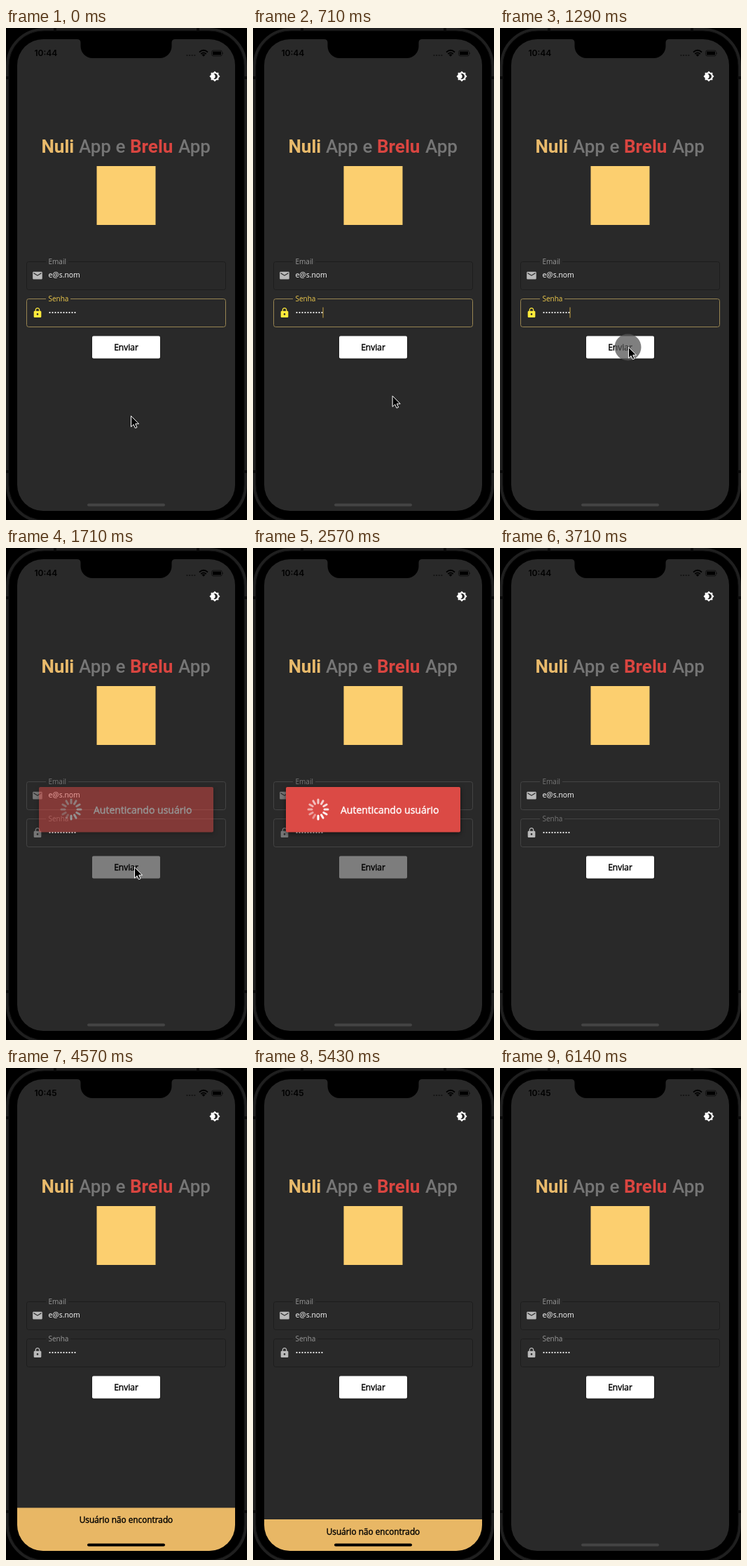
Write an HTML page that moves like this. It is 344 px wide and 702 px high and loops after 6.28 s.

```html
<!DOCTYPE html>
<html lang="pt-BR">
<head>
<meta charset="utf-8">
<title>Login</title>
<style>
html, body { margin: 0; width: 100%; height: 100%; overflow: hidden; background: #000; }
svg {
  display: block; width: 100%; height: 100%; font: 12px "Open Sans", sans-serif;
  --line: #1d1d1d; --label: #999; --icon: #b9b9b9; --button: #fff;
  --pass-line: var(--line); --pass-label: var(--label); --pass-icon: var(--icon);
}
svg.focus { --pass-line: #988552; --pass-label: #f0cb4c; --pass-icon: #ffeb3b; }
svg.busy { --line: #444; --label: #777; --icon: #777; --button: #7d7d7d; }
svg.settling { --line: #444; --label: #777; }
.mail rect { stroke: var(--line); }
.mail .label { fill: var(--label); }
.mail path { fill: var(--icon); }
.pass rect { stroke: var(--pass-line); }
.pass .label { fill: var(--pass-label); }
.pass path { fill: var(--pass-icon); }
.label { font-size: 10px; }
.title { font: 700 26px Roboto, sans-serif; }
.title .plain { font-weight: 500; fill: #757575; }
.heavy { stroke: currentColor; stroke-width: .4; fill: currentColor; }
#button { fill: var(--button); }
svg:not(.busy) #button { filter: drop-shadow(0 1px 1px #0006); }
#dialog rect { filter: drop-shadow(0 2px 3px #0008); }
</style>
</head>
<body>
<svg id="stage" viewBox="0 0 344 702">
  <clipPath id="screen"><rect x="16" y="16" width="311" height="673" rx="37"/></clipPath>

  <g fill="none">
    <rect x="2" y="2" width="340" height="702" rx="52" stroke="#1f1f1f" stroke-width="4"/>
    <rect x="4" y="4" width="336" height="698" rx="50" stroke="#0f0f0f"/>
    <path d="M0 71h5M339 71h5M0 633h5M339 633h5M70 0v5M274 0v5" stroke="#0a0a0a" stroke-width="4"/>
  </g>

  <g clip-path="url(#screen)">
    <rect width="344" height="702" fill="#292929"/>
    <path d="M101.5 16q5 0 5 5v5a17 17 0 0 0 17 17h96a17 17 0 0 0 17-17v-5q0-5 5-5z"/>
    <text id="clock" x="40.5" y="40" style="font:600 12px Inter,sans-serif"></text>
    <g fill="none" stroke="#000">
      <path d="M257.5 39h13" stroke="#151515" stroke-width="2" stroke-dasharray="2 1.6"/>
      <path d="M276 34.5q6-5.5 12 0M278.3 37q3.7-3.2 7.4 0" stroke-width="1.8"/>
      <rect x="293.5" y="32" width="15" height="8" rx="2.5" stroke="#111"/>
    </g>
    <path d="M279.6 38.2q2.4-1.8 4.8 0l-2.4 2.5zM295 33.5h12v5h-12zM309.5 34.5q1.5 1.5 0 3z"/>

    <path transform="translate(290 61) scale(.667)" fill="#fff" d="M20 8.69V4h-4.69L12 .69 8.69 4H4v4.69L.69 12 4 15.31V20h4.69L12 23.31 15.31 20H20v-4.69L23.31 12zM12 18c-.89 0-1.74-.2-2.5-.55C11.56 16.5 13 14.42 13 12s-1.44-4.5-3.5-5.45C10.26 6.2 11.11 6 12 6c3.31 0 6 2.69 6 6s-2.69 6-6 6z"/>

    <text class="title" y="178"><tspan x="50.5" fill="#e9ba6b">Nuli</tspan><tspan class="plain" x="104">App e</tspan><tspan x="177" fill="#d94540">Brelu</tspan><tspan class="plain" x="246">App</tspan></text>
    <rect x="129.5" y="197" width="84" height="84" fill="#fccf6f"/>

    <g class="mail">
      <rect x="29.5" y="333.5" width="284" height="40" rx="3" fill="none"/>
      <path style="fill:#292929" d="M57 332h32v3H57z"/>
      <text class="label" x="60.5" y="336.5">Email</text>
      <path transform="translate(36.8 345) scale(.68)" d="M20 4H4c-1.1 0-2 .9-2 2v12c0 1.1.9 2 2 2h16c1.1 0 2-.9 2-2V6c0-1.1-.9-2-2-2zm0 4l-8 5-8-5V6l8 5 8-5v2z"/>
      <text x="60.5" y="356" font-size="10.4" fill="#fff">e@s.nom</text>
    </g>
    <g class="pass">
      <rect x="29.5" y="386.5" width="284" height="40" rx="3" fill="none"/>
      <path style="fill:#292929" d="M57 385h35v3H57z"/>
      <text class="label" x="60.5" y="389.5">Senha</text>
      <path transform="translate(37 398.3) scale(.667)" d="M18 8h-1V6c0-2.76-2.24-5-5-5S7 3.24 7 6v2H6c-1.1 0-2 .9-2 2v10c0 1.1.9 2 2 2h12c1.1 0 2-.9 2-2V10c0-1.1-.9-2-2-2zm-6 9c-1.1 0-2-.9-2-2s.9-2 2-2 2 .9 2 2-.9 2-2 2zm3.1-9H8.9V6c0-1.71 1.39-3.1 3.1-3.1 1.71 0 3.1 1.39 3.1 3.1v2z"/>
      <path style="fill:none" d="M62.5 406h37" stroke="#fff" stroke-width="2.2" stroke-linecap="round" stroke-dasharray="0 4"/>
    </g>
    <path id="caret" d="M100 398.5v15" stroke="#c9a445"/>

    <rect id="button" x="123" y="439.5" width="97" height="32" rx="2"/>
    <text class="heavy" x="171.5" y="459.5" text-anchor="middle">Enviar</text>

    <g id="dialog">
      <rect x="47" y="341" width="249" height="64.5" rx="2" fill="#db4a45"/>
      <g id="spinner" stroke="#fff" stroke-width="3" stroke-linecap="round"></g>
      <text class="heavy" x="125" y="378.5" font-size="14" color="#fff">Autenticando usuário</text>
    </g>

    <g id="snackbar">
      <rect x="16" y="627.5" width="311" height="70" fill="#e8b765"/>
      <text class="heavy" x="171.5" y="649" font-size="11.8" text-anchor="middle">Usuário não encontrado</text>
    </g>
    <rect id="home" x="116" y="678.5" width="111" height="4" rx="2"/>
  </g>

  <circle id="touch" cx="182.5" cy="455.5" r="19" fill="#555" opacity=".75"/>
  <path id="cursor" d="M0 0v15.5l3.6-3.3 2.3 5.2 2.6-1.1-2.3-5h4.9z" stroke="#fff"/>
</svg>
<script>
const LOOP = 6280, TICKS = 44, PETALS = 12;
const $ = id => document.getElementById(id);
const show = (id, opacity) => $(id).style.opacity = Number(opacity);
const move = (id, x, y) => $(id).setAttribute('transform', `translate(${x} ${y})`);
const clamp = v => Math.min(1, Math.max(0, v));
const bezier = (a, b, c, u) => a * (1 - u) ** 2 + 2 * b * u * (1 - u) + c * u * u;

$('spinner').innerHTML = Array.from({ length: PETALS }, (_, i) =>
  `<path d="M93 364v-5" transform="rotate(${i * 360 / PETALS} 93 373)"/>`).join('');
const petals = [...$('spinner').children];

function draw(k) {
  const state = k < 11 ? 'focus' : k < 26 ? 'busy' : k < 27 ? 'settling' : 'idle';
  $('stage').setAttribute('class', state);
  $('clock').textContent = k < 30 ? '10:44' : '10:45';

  const u = clamp((k - 1) / 8), eased = u * u * (3 - 2 * u);
  move('cursor', bezier(178.5, 225, 183.5, eased), bezier(553.5, 510, 455.5, eased));
  show('cursor', k < 12);
  show('touch', k >= 9 && k < 11 ? .75 : 0);
  show('caret', k < 11 && k % 7 > 1 && k % 7 < 6);

  show('dialog', k < 11 || k > 25 ? 0 : k === 11 || k === 25 ? .5 : 1);
  petals.forEach((petal, i) => {
    const phase = (i + TICKS * PETALS - k * 1.7) % PETALS;
    petal.style.opacity = .4 + .6 * phase / (PETALS - 1);
  });

  show('snackbar', k >= 27 && k < 39);
  move('snackbar', 0, k === 38 ? 16.5 : 0);
  const grey = k < 39 ? 68 * clamp((30 - k) / 2) : 68;
  $('home').style.fill = `rgb(${grey},${grey},${grey})`;
}

function frame() {
  draw(Math.floor(performance.now() % LOOP / LOOP * TICKS));
  requestAnimationFrame(frame);
}
frame();
</script>
</body>
</html>
```
